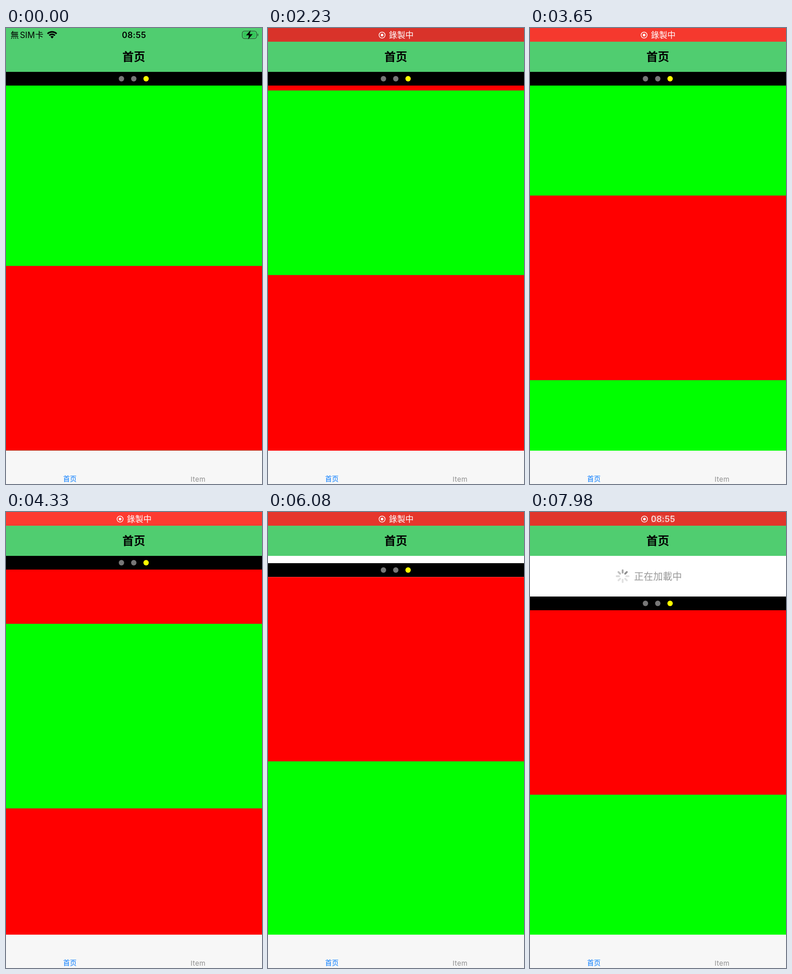
An HTML page with a canvas for the animation above (8000 ms loop, 561 px wide and 998 px high).

```html
<!DOCTYPE html>
<html lang="zh">
<head>
<meta charset="utf-8">
<style>
  html, body { margin: 0; width: 100%; height: 100%; overflow: hidden; background: #fff; }
  canvas { display: block; width: 561px; height: 998px; }
</style>
</head>
<body>
<canvas id="stage" width="561" height="998"></canvas>
<script>
const LOOP = 8000, W = 561, NAV = 96, HEADER = 30, ROW = 404, TABS = 925;
const SC = 'Inter, "Noto Sans CJK SC", "Noto Sans CJK", sans-serif';
const TC = 'Inter, "Noto Sans CJK TC", "Noto Sans CJK", sans-serif';
const ctx = document.getElementById('stage').getContext('2d');

const clamp = x => Math.min(1, Math.max(0, x));
const mix = (a, b, k) => a + (b - a) * k;
const ramp = (t, from, to) => clamp((t - from) / (to - from));
const smooth = k => k * k * (3 - 2 * k);
const easeOut = k => 1 - (1 - k) ** 2.5;

// Scroll moves: start, end, offset before, offset after, easing.
const moves = [
  [2150, 2750, 413, 7, smooth],
  [2930, 3600, 7, 567, smooth],
  [4150, 4870, 567, 20, easeOut],
  [5870, 6640, 20, -177, smooth],
  [6750, 7200, -177, -89, easeOut]
];

function scrollAt(t) {
  let offset = moves[0][2];
  for (const [start, end, a, b, ease] of moves)
    if (t >= start) offset = mix(a, b, ease(ramp(t, start, end)));
  return offset;
}

function rect(x, y, w, h, color) {
  ctx.fillStyle = color;
  ctx.fillRect(x, y, w, h);
}

function disc(x, y, r, color) {
  ctx.fillStyle = color;
  ctx.beginPath();
  ctx.arc(x, y, r, 0, 7);
  ctx.fill();
}

function text(str, x, cy, size, color, { weight = 400, family = SC, align = 'center', spacing = 0 } = {}) {
  ctx.font = `${weight} ${size}px ${family}`;
  ctx.textAlign = align;
  ctx.letterSpacing = spacing + 'px';
  ctx.fillStyle = color;
  ctx.fillText(str, x, cy + size * 0.37);
}

function faded(alpha, draw) {
  if (alpha <= 0) return;
  ctx.save();
  ctx.globalAlpha = alpha;
  draw();
  ctx.restore();
}

function drawRows(scroll) {
  const top = NAV + HEADER + Math.max(0, -scroll);
  ctx.save();
  ctx.beginPath();
  ctx.rect(0, top, W, TABS - top);
  ctx.clip();
  for (let i = 0; i < 5; i++) {
    const y = Math.round(NAV + HEADER + i * ROW - scroll);
    rect(0, y, W, ROW, i % 2 ? '#0f0' : '#f00');
    rect(0, y + ROW - 1, W, 1, 'rgba(110,110,60,.6)');
  }
  ctx.restore();
}

function drawSectionHeader(y) {
  rect(0, y, W, HEADER, '#000');
  [253, 280, 307].forEach((x, i) => disc(x, y + 15, 5.9, i === 2 ? '#ff0' : '#777'));
}

function drawLoader(cy, t) {
  const head = Math.floor((t - 6740) / 100 + 84.6) % 8;
  ctx.save();
  ctx.translate(203, cy);
  ctx.lineWidth = 4;
  ctx.lineCap = 'round';
  for (let i = 0; i < 8; i++) {
    const age = (head - i + 8) % 8;
    const shade = Math.min(225, 145 + age * 24);
    ctx.strokeStyle = `rgb(${shade},${shade},${shade})`;
    ctx.save();
    ctx.rotate(i * Math.PI / 4);
    ctx.beginPath();
    ctx.moveTo(0, -7.8);
    ctx.lineTo(0, -13);
    ctx.stroke();
    ctx.restore();
  }
  ctx.restore();
  text('正在加載中', 228, cy, 21, '#999', { family: TC, align: 'left' });
}

function drawWifi(color) {
  ctx.strokeStyle = color;
  ctx.lineWidth = 3.4;
  for (const r of [8.7, 14]) {
    ctx.beginPath();
    ctx.arc(101, 22.5, r, -Math.PI * 0.75, -Math.PI * 0.25);
    ctx.stroke();
  }
  ctx.fillStyle = color;
  ctx.beginPath();
  ctx.moveTo(101, 23);
  ctx.arc(101, 22.5, 5, -Math.PI * 0.75, -Math.PI * 0.25);
  ctx.fill();
}

function drawBattery(color) {
  ctx.strokeStyle = ctx.fillStyle = color;
  faded(ctx.globalAlpha * 0.5, () => {
    ctx.lineWidth = 1.5;
    ctx.beginPath();
    ctx.roundRect(517.7, 6.7, 31.6, 16.6, 5);
    ctx.stroke();
    ctx.fillRect(551, 12.5, 1.8, 5);
  });
  ctx.fillStyle = '#34c759';
  ctx.beginPath();
  ctx.roundRect(520, 9, 27, 12, 3);
  ctx.fill();
  ctx.beginPath();
  [[536, 5], [526, 16], [532.5, 16], [530.5, 25], [540.5, 13.5], [534, 13.5]].forEach(p => ctx.lineTo(...p));
  ctx.closePath();
  ctx.fillStyle = color;
  ctx.fill();
}

function drawSides(color) {
  text('無', 10, 15, 18, color, { family: TC, align: 'left' });
  text('SIM', 30.5, 15, 18, color, { align: 'left' });
  text('卡', 64, 15, 18, color, { family: TC, align: 'left' });
  drawWifi(color);
  drawBattery(color);
}

function drawRecordMark(x) {
  ctx.strokeStyle = '#fff';
  ctx.lineWidth = 1.5;
  ctx.beginPath();
  ctx.arc(x, 15.5, 6.6, 0, 7);
  ctx.stroke();
  disc(x, 15.5, 2.9, '#fff');
}

function drawStatus(t) {
  const recording = smooth(ramp(t, 350, 950));
  const pulse = (1 - Math.cos((t - 1950) / 5200 * 2 * Math.PI)) / 2;
  const red = [[216, 255], [51, 59], [42, 48]].map(([a, b]) => Math.round(mix(a, b, pulse)));
  const label = ramp(t, 1800, 2050) * (1 - ramp(t, 7780, 8030));
  const clock = { weight: 600, spacing: 0.4 };

  faded(recording, () => rect(0, 0, W, 30, `rgb(${red})`));
  faded(1 - recording, () => {
    drawSides('#000');
    text('08:55', 280.5, 15.5, 18, '#000', clock);
  });
  faded(recording * (1 - ramp(t, 1800, 2050)), () => drawSides('#fff'));
  faded(recording, () => drawRecordMark(mix(251, 250, label)));
  faded(recording * (1 - label), () => text('08:55', 291.5, 15.5, 18, '#fff', clock));
  faded(label, () => text('錄製中', 292, 15, 18, '#fff', { family: TC }));
}

function render(t) {
  const scroll = scrollAt(t);
  const headerY = Math.round(NAV + Math.max(0, -scroll));
  rect(0, 0, W, 998, '#fff');
  drawRows(scroll);
  if (scroll < 0) drawLoader(headerY - 44.5, t);
  drawSectionHeader(headerY);

  rect(0, 0, W, NAV, '#50cd70');
  text('首页', 280, 63, 25, '#000', { weight: 600 });
  drawStatus(t);

  rect(0, TABS, W, 998 - TABS, '#f7f7f7');
  text('首页', 140, 987, 14.7, '#007aff', { weight: 500 });
  text('Item', 421, 987, 15, '#8e8e8e', { spacing: 0.5 });
}

function frame() {
  render(performance.now() % LOOP);
  requestAnimationFrame(frame);
}
frame();
</script>
</body>
</html>
```
